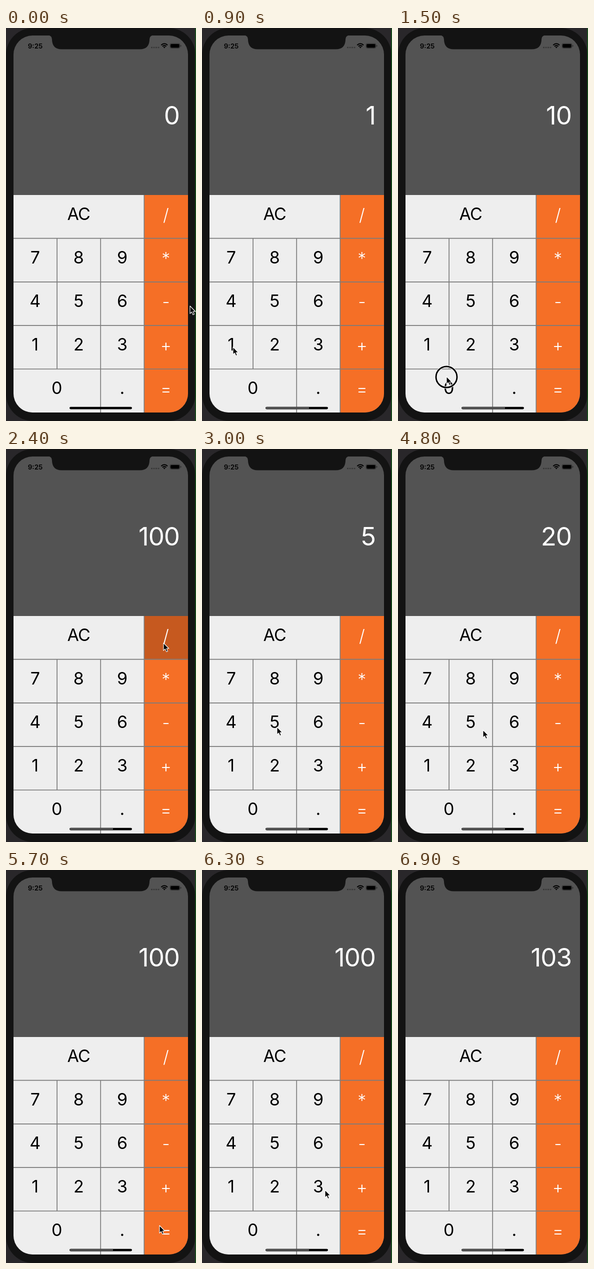
An HTML page for the animation above (7.2 s loop, 380 by 786 pixels).

```html
<!DOCTYPE html>
<html lang="en">
<head>
<meta charset="utf-8">
<title>Calculator</title>
<style>
  html, body { margin: 0; width: 100%; height: 100%; overflow: hidden; background: #29272a; }
  svg { display: block; width: 100vw; height: 100vh; }
  text { font-family: Inter, Roboto, sans-serif; }
  .key { font-size: 34px; text-anchor: middle; }
  .op { fill: #fff; font-weight: 300; }
</style>
</head>
<body>
<svg viewBox="0 0 380 786">
  <defs>
    <clipPath id="screen"><rect x="15" y="15" width="349" height="754" rx="38"/></clipPath>
  </defs>
  <rect width="380" height="786" fill="#29272a"/>
  <rect x="0" y="0" width="379" height="786" rx="54" fill="#131313"/>
  <rect x="378.5" width="1.5" height="786" fill="#17591b"/>
  <g clip-path="url(#screen)">
    <rect x="15" y="15" width="349" height="754" fill="#535353"/>
    <g id="pad"></g>
  </g>
  <path d="M84 14.5Q92 15 92 23V24Q93 42.5 111 42.5H268Q286 42.5 287 24V23Q287 15 295 14.5Z" fill="#131313"/>

  <text x="58.5" y="41" font-size="13.5" font-weight="600" text-anchor="middle">9:25</text>
  <path d="M290 39h3m1.5 0h3m1.5 0h3m1.5 0h3" stroke="#383838" stroke-width="2.6"/>
  <g fill="none" stroke="#000" stroke-width="2">
    <path d="M310.3 34.3Q316.7 28.3 323.1 34.3M312.8 36.8Q316.7 33.4 320.6 36.8"/>
    <path d="M314.5 38.2L316.7 40.6L318.9 38.2Q316.7 36.6 314.5 38.2Z" fill="#000" stroke="none"/>
  </g>
  <rect x="327.9" y="30.9" width="20" height="9.6" rx="2.8" fill="none" stroke="#333" stroke-width=".9"/>
  <rect x="329" y="32" width="17.8" height="7.4" rx="1.8"/>
  <path d="M349 34v3.6q1.4-.5 1.4-1.8t-1.4-1.8Z" fill="#222"/>

  <text id="value" x="347" y="192.5" font-size="51" letter-spacing="-1" text-anchor="end" fill="#fff"></text>
  <rect x="127" y="757.7" width="125" height="4.8" rx="2.4"/>
  <path id="fade" d="M214 757.7H129.4a2.4 2.4 0 0 0 0 4.8H214Z" fill="#505050"/>

  <g id="ring" fill="none">
    <circle r="21" stroke="#fff" stroke-width="5"/>
    <circle r="21" stroke="#000" stroke-width="3"/>
  </g>
  <path id="cursor" d="M0 0V15.2L3.4 12L5.9 17.6L8.5 16.5L6.1 11H10.8Z" fill="#000" stroke="#fff" stroke-width="1.1" stroke-linejoin="round"/>
</svg>
<script>
const $ = id => document.getElementById(id);
const LEFT = 15, TOP = 334, CELL = 87.1;
const STEP = 300, LOOP = 7200;
const ORANGE = '#f56f26', PRESSED = '#c6591f';

// Each row lists label and column span.
const rows = [
  [['AC', 3], ['/', 1]],
  [['7', 1], ['8', 1], ['9', 1], ['*', 1]],
  [['4', 1], ['5', 1], ['6', 1], ['-', 1]],
  [['1', 1], ['2', 1], ['3', 1], ['+', 1]],
  [['0', 2], ['.', 1], ['=', 1]]
];

function buildPad() {
  let cells = '', lines = '', labels = '';
  rows.forEach((row, r) => {
    const y = TOP + r * CELL;
    let col = 0;
    for (const [label, span] of row) {
      const x = LEFT + col * CELL, w = span * CELL, op = col === 3;
      cells += `<rect data-key="${label}" x="${x}" y="${y}" width="${w + 1}" height="${CELL}" fill="${op ? ORANGE : '#eee'}"/>`;
      if (col) lines += `M${x} ${y}v${CELL}`;
      labels += `<text class="key${op ? ' op' : ''}" x="${x + w / 2 - (op ? 0 : .3)}" y="${y + (op ? 51.5 : 50)}"${span === 3 ? ' letter-spacing="-.8"' : ''}>${label}</text>`;
      col += span;
    }
    if (r) lines += `M15 ${y - .4}H364`;
  });
  $('pad').innerHTML = `${cells}<path d="${lines}" stroke="#7d7d7d" stroke-width="1.7"/>${labels}`;
}

// Pointer positions, one per step.
const pointer = [
  [368, 556], [250, 590], [110, 628], [62, 638], [80, 670], [97, 697],
  [97, 697], [235, 510], [315, 388], [215, 500], [150, 556], [260, 660],
  [319, 721], [319, 590], [318, 470], [316, 464], [170, 562], [152, 556],
  [250, 655], [307, 711], [316, 640], [246, 640], [238, 640]
];
// Display values keyed by the step at which they appear.
const values = [[0, '0'], [3, '1'], [5, '10'], [6, '100'], [10, '5'], [12, '20'],
  [17, '5'], [19, '100'], [22, '3'], [23, '103']];
const presses = { 8: '/', 15: '*', 20: '+' };

function place(el, pos, on) {
  el.style.display = on ? '' : 'none';
  if (on) el.setAttribute('transform', `translate(${pos})`);
}

function draw(ms) {
  const step = Math.floor(ms % LOOP / STEP);
  const pos = pointer[step];
  $('value').textContent = values.filter(v => v[0] <= step).pop()[1];
  for (const key of ops)
    key.setAttribute('fill', presses[step] === key.dataset.key ? PRESSED : ORANGE);
  place($('cursor'), pos, Boolean(pos));
  place($('ring'), [97, 698], step === 5);
  $('fade').style.display = step ? '' : 'none';
}

buildPad();
const ops = [...document.querySelectorAll('rect[data-key]')].filter(k => '/*-+='.includes(k.dataset.key));
const start = performance.now();
function tick() {
  draw(performance.now() - start);
  requestAnimationFrame(tick);
}
tick();
</script>
</body>
</html>
```
